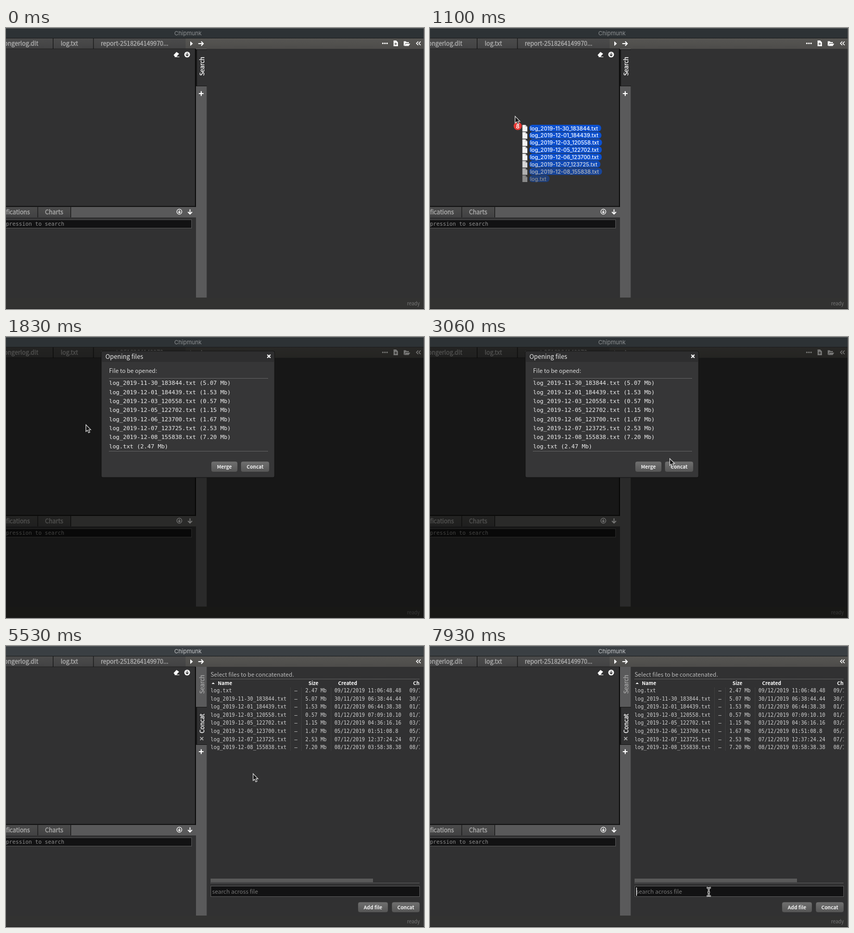
These frames come from a looping animation (803 by 540 pixels, 8000 ms). An HTML page:

```html
<!DOCTYPE html>
<html lang="en">
<head>
<meta charset="utf-8">
<title>Chipmunk</title>
<style>
  html, body { margin: 0; width: 100%; height: 100%; overflow: hidden; background: #1c1c1c; }
  svg { display: block; }
  text { fill: currentColor; font: 11.1px "Noto Sans CJK SC", "Noto Sans CJK JP", "Noto Sans CJK", "Open Sans", sans-serif; }
  text.tab { font-size: 11.5px; stroke: currentColor; stroke-width: .3px; }
  text.small { font-size: 9.5px; font-weight: 700; }
  text.status { font-size: 9.4px; }
  text.heading { font-size: 11.9px; }
  text.sys { font: 11px Inter, Roboto, sans-serif; }
  text.file { font: 500 10.25px Inter, Roboto, sans-serif; }
  text.mono { font-family: "DejaVu Sans Mono", "Liberation Mono", monospace; }
  text.cell { font-size: 9.7px; }
  text.hint { font-size: 10.35px; }
</style>
</head>
<body>
<svg id="stage" width="803" height="540" viewBox="0 0 803 540"></svg>
<script>
const LOOP = 8000;
const BODY = '#313132';
const FILES = [
  ['log_2019-11-30_183844.txt', '5.07', '30/11/2019 06:38:44.44'],
  ['log_2019-12-01_184439.txt', '1.53', '01/12/2019 06:44:38.38'],
  ['log_2019-12-03_120558.txt', '0.57', '01/12/2019 07:09:10.10'],
  ['log_2019-12-05_122702.txt', '1.15', '03/12/2019 04:36:16.16'],
  ['log_2019-12-06_123700.txt', '1.67', '05/12/2019 01:51:08.8'],
  ['log_2019-12-07_123725.txt', '2.53', '07/12/2019 12:37:24.24'],
  ['log_2019-12-08_155838.txt', '7.20', '08/12/2019 03:58:38.38'],
  ['log.txt', '2.47', '09/12/2019 11:06:48.48'],
];

// Markup helpers
const rect = (x, y, w, h, fill, extra = '') =>
  `<rect x="${x}" y="${y}" width="${w}" height="${h}" fill="${fill}" ${extra}/>`;
const text = (x, y, str, color, cls = '', extra = '') =>
  `<text x="${x}" y="${y}" color="${color}" class="${cls}" ${extra}>${str}</text>`;
const stroke = (d, color = '#fff', width = 1.8, extra = '') =>
  `<path d="${d}" fill="none" stroke="${color}" stroke-width="${width}" ${extra}/>`;
const shape = (d, fill = '#fff', extra = '') => `<path d="${d}" fill="${fill}" ${extra}/>`;
const group = (id, content, extra = '') => `<g id="${id}" ${extra}>${content}</g>`;
const dotted = d => stroke(d, '#8a8a8a', 1, 'stroke-dasharray="1 1"');
const field = (x, y, w, h) => rect(x + .5, y + .5, w - 1, h - 1, '#121213', 'stroke="#565656"');
const button = (x, y, w, h, label) =>
  rect(x, y, w, h, 'url(#button)', 'rx="4" stroke="#2a2a2a" stroke-width=".6"') +
  text(x + w / 2, y + h / 2 + 3.5, label, '#f0f0f0', 'small', 'text-anchor="middle"');
const sideLabel = (y, label, color) =>
  text(0, 0, label, color, 'tab', `text-anchor="middle" transform="translate(380.5 ${y}) rotate(-90)"`);
const sideTab = (y, h) => rect(365, y, 21, h, '#161616') + rect(367, y + 1, 19, h - 2, BODY);
const plus = y => stroke(`M370.5 ${y}h9M375 ${y - 4.5}v9`, '#fff', 2);
const gradient = (id, top, bottom) =>
  `<linearGradient id="${id}" x2="0" y2="1"><stop stop-color="${top}"/><stop offset="1" stop-color="${bottom}"/></linearGradient>`;

function mainWindow() {
  const end = 'text-anchor="end"';
  return rect(0, 0, 803, 540, BODY) +
    // top bar and file tabs
    rect(0, 20, 803, 20, 'url(#bar)') + rect(0, 20, 345, 20, 'url(#tab)') +
    rect(0, 39.5, 364, 1, '#202020') + rect(90, 20, 1, 20, '#0c0c0c') + rect(167.5, 20, 1, 20, '#0c0c0c') +
    text(62, 34, 'longerlog.dlt', '#b0b0b0', 'tab', end) +
    text(105, 34, 'log.txt', '#b0b0b0', 'tab') +
    text(182, 34, 'report-2518264149970...', '#b0b0b0', 'tab') +
    shape('M354 25.5l5 4.5-5 4.5z') +
    stroke('M369.5 30h9M375 26l4 4-4 4') +
    stroke('M792 26l-3.5 3.5 3.5 3.5M796.5 26l-3.5 3.5 3.5 3.5', '#fff', 1.5) +
    // log view toolbar
    shape('M322 52l5.5-6 5 3.5-5 5.5h-3z') + stroke('M324 55.5h9M324 50l4.5 4', '#fff', 1) +
    '<circle cx="348" cy="51" r="5.5" fill="#fff"/>' +
    stroke('M348 47.5v6M345.3 51l2.7 2.7 2.7-2.7', BODY, 1.4) +
    rect(363, 40, 2, 304, '#0d0d0d') + rect(0, 342, 364, 1.5, '#0d0d0d') +
    // bottom panel
    rect(0, 344, 365, 20, '#59595a') + rect(0, 344, 125, 20, 'url(#tab)') +
    rect(60.5, 344, 1, 20, '#0c0c0c') + rect(124, 344, 1, 20, '#0c0c0c') +
    text(46, 358, 'Notifications', '#b0b0b0', 'tab', end) + text(75, 358, 'Charts', '#b0b0b0', 'tab') +
    '<circle cx="333" cy="353" r="4.8" fill="none" stroke="#fff" stroke-width="1.2"/>' +
    stroke('M333 350v5.5M330.7 353l2.3 2.5 2.3-2.5', '#fff', 1.3) +
    stroke('M353.5 348.5v9M349.5 353.5l4 4 4-4') +
    field(-5, 368, 362, 17) + text(112, 380, 'expression to search', '#8c8c8c', 'mono hint', end) +
    // side strip and status bar
    rect(365, 40, 20.5, 478, '#5a5a5b') +
    rect(0, 518, 803, 22, '#323231') + text(795, 533, 'ready', '#777', 'status', end);
}

function searchSide() {
  return sideTab(41, 71) + sideLabel(73.5, 'Search', '#fff') + plus(126) +
    [724, 728, 732].map(x => `<circle cx="${x}" cy="29.5" r="1.5" fill="#fff"/>`).join('') +
    shape('M744.5 24h5l3.5 3.5v7.5h-8.5z') + stroke('M748.7 28v5M746.2 30.5h5', '#53524f', 1.2) +
    shape('M764 34v-8.5h4l1.5 1.5h4.5v2h-6.5l-2.5 5zM765 34.5l2.8-4.5h8.7l-2.8 4.5z');
}

function concatSide() {
  return sideLabel(73.5, 'Search', '#a6a6a6') + sideTab(117, 73) + sideLabel(149, 'Concat', '#fff') +
    stroke('M373 175l6 6M379 175l-6 6', '#b0b0b0', 1.7) + plus(203) +
    text(393, 59, 'Select files to be concatenated.', '#b8b8b8') + dotted('M393 63.5H795') +
    shape('M395 73l3-3 3 3z') + text(407, 75, 'Name', '#fff', 'small') +
    text(581, 75, 'Size', '#fff', 'small') + text(638, 75, 'Created', '#fff', 'small') +
    text(782, 75, 'Ch', '#fff', 'small') +
    group('rows', tableRows()) +
    rect(393, 447, 312, 7, '#5a5a5a') + dotted('M393 455.5H795') +
    field(393, 461, 402, 21) + text(396, 476, 'search across file', '#777') +
    button(676, 492, 58, 20, 'Add file') + button(741, 492, 54, 20, 'Concat');
}

function tableRows() {
  const sorted = [FILES[7], ...FILES.slice(0, 7)];
  const cells = sorted.map(([name, size, created], i) => {
    const y = 89 + 15.6 * i;
    const cell = (x, str) => text(x, y, str, '#d2d2d2', 'mono cell');
    return cell(393, name) + cell(554, '–') + cell(575, size + ' Mb') + cell(631, created) + cell(775, created);
  }).join('');
  const rules = stroke('M546.5 80V202M567.5 80V202M624.5 80V202', '#4b4b4b', 1, 'stroke-dasharray="1 1"');
  return `<g clip-path="url(#tableClip)">${rules}${cells}</g>`;
}

function dialog() {
  const rows = FILES.map(([name, size], i) =>
    text(198, 92.3 + 17.35 * i, `${name} (${size} Mb)`, '#eee', 'mono')).join('');
  return rect(0, 20, 803, 520, '#020200', 'opacity=".54"') +
    rect(183, 27, 333, 243, '#363637', 'rx="3" stroke="#111"') +
    rect(184, 28, 331, 20, '#2e2e2f', 'rx="2"') +
    text(191, 42, 'Opening files', '#e8e8e8', 'heading') +
    stroke('M502 34l6 6M508 34l-6 6', '#fff', 2) +
    text(198, 69, 'File to be opened:', '#d8d8d8') +
    dotted('M198 79.5H503M198 219.5H503') + rows +
    button(394, 239, 51, 20.5, 'Merge') + button(451, 239, 55, 20.5, 'Concat');
}

// Dragged files, placed relative to the pointer tip
function dragged() {
  const opacity = [1, 1, 1, 1, 1, .85, .65, .45];
  return FILES.map(([name], i) => {
    const y = 28 + 13.87 * i;
    return `<g opacity="${opacity[i]}">` +
      shape(`M20 ${y - 6.3}h6l3.5 3.5v9.3h-9.5z`, '#f4f4f4') + shape(`M26 ${y - 6.3}v3.5h3.5z`, '#aaa') +
      rect(33, y - 6.5, 143, 13, '#0b50d0', 'rx="6" class="pill"') + text(35, y + 4, name, '#fff', 'file') + '</g>';
  }).join('') +
    '<circle cx="11" cy="24" r="7.8" fill="#e53935"/>' +
    text(11, 28, '8', '#fff', 'sys', 'text-anchor="middle" style="font-weight:600"');
}

const beam = 'M-4 -8q4 0 4 3V5q0 3 4 3M4 -8q-4 0 -4 3M-4 8q4 0 4 -3M-2.5 1h5';

document.getElementById('stage').innerHTML =
  `<defs>${gradient('bar', '#565552', '#4d4c4a')}${gradient('tab', '#4b4b4b', '#424243')}${gradient('button', '#707070', '#555')}
  <clipPath id="tableClip"><rect x="393" y="78" width="402" height="370"/></clipPath></defs>` +
  mainWindow() + group('searchSide', searchSide()) + group('concatSide', concatSide()) +
  group('dialog', dialog()) +
  rect(0, 0, 803, 19, '#2d3235', 'id="titleBar"') + rect(0, 19, 803, 1, '#1b1c1d') +
  text(349.5, 14, 'Chipmunk', '#8d9092', 'sys', 'id="title" text-anchor="middle"') +
  rect(0, 0, 803, 1, '#5c6062') + rect(802, 0, 1, 540, '#555') + rect(0, 539, 803, 1, '#202020') +
  rect(396, 464, 1.4, 16, '#eee', 'id="caret"') +
  group('drag', dragged()) +
  group('arrow', shape('M0 0V13.2L3 10.6 5.2 15.6 7.6 14.5 5.5 9.7H9.4Z', '#161616', 'stroke="#e4e4e4" stroke-width="1.1"')) +
  group('beam', stroke(beam, '#eee', 3) + stroke(beam, '#222', 1));

// Each pill fits its file name
for (const pill of document.querySelectorAll('.pill'))
  pill.setAttribute('width', pill.nextElementSibling.getComputedTextLength() + 8);

// Pointer path: time, x, y
const POINTER = [
  [100, 500, 540], [260, 500, 408], [500, 500, 408], [630, 315, 256], [700, 305, 200],
  [900, 305, 200], [1100, 163, 169], [1300, 153, 168], [2600, 153, 168], [3060, 460, 233],
  [3360, 470, 246], [5500, 470, 246], [5530, 474, 245], [5700, 505, 222], [5830, 530, 217],
  [6080, 559, 300], [6330, 548, 432], [6360, 547, 434], [6600, 535, 472],
];
// The dragged files run slightly ahead of the drawn pointer on the second move
const DRAG = POINTER.slice(0, 8).map(k => k[0] === 1100 ? [1100, 157, 164] : k);

// Monotone cubic interpolation, so the path never overshoots its keys
function sample(keys, axis, t) {
  const last = keys.length - 1;
  if (t <= keys[0][0]) return keys[0][axis];
  if (t >= keys[last][0]) return keys[last][axis];
  const i = keys.findIndex(k => k[0] > t) - 1;
  const slope = j => (keys[j + 1][axis] - keys[j][axis]) / (keys[j + 1][0] - keys[j][0]);
  const tangent = j => {
    if (j === 0 || j === last) return 0;
    const a = slope(j - 1), b = slope(j);
    return a * b > 0 ? 2 * a * b / (a + b) : 0;
  };
  const span = keys[i + 1][0] - keys[i][0], u = (t - keys[i][0]) / span;
  const ease = u * u * (3 - 2 * u);
  return keys[i][axis] * (1 - ease) + keys[i + 1][axis] * ease +
    span * u * (1 - u) * (tangent(i) * (1 - u) - tangent(i + 1) * u);
}

const el = id => document.getElementById(id);
const show = (id, on) => el(id).setAttribute('visibility', on ? 'visible' : 'hidden');
// Points name whole pixels, so shapes sit on pixel centres
const move = (id, x, y) => el(id).setAttribute('transform', `translate(${(x + .5).toFixed(1)} ${(y + .5).toFixed(1)})`);

function render(t) {
  const x = sample(POINTER, 1, t), y = sample(POINTER, 2, t);
  const inField = t > 6330 && y > 460;
  const concat = t >= 4330, active = t >= 3700;
  move('arrow', x, y);
  move('beam', x, y);
  move('drag', sample(DRAG, 1, t), sample(DRAG, 2, t));
  show('arrow', t >= 130 && !inField);
  show('beam', inField);
  show('drag', t >= 130 && t < 1795);
  el('drag').setAttribute('opacity', t < 1760 ? 1 : .5);
  show('dialog', t >= 1830 && !concat);
  show('searchSide', !concat);
  show('concatSide', concat);
  show('rows', t >= 4400);
  show('caret', t >= 6930 && Math.floor((t - 6930) / 500) % 2 === 0);
  el('titleBar').setAttribute('fill', active ? '#3a3f43' : '#2d3235');
  el('title').setAttribute('color', active ? '#c4c6c8' : '#8d9092');
}

const start = performance.now();
function tick() {
  render((performance.now() - start) % LOOP);
  requestAnimationFrame(tick);
}
tick();
</script>
</body>
</html>
```
